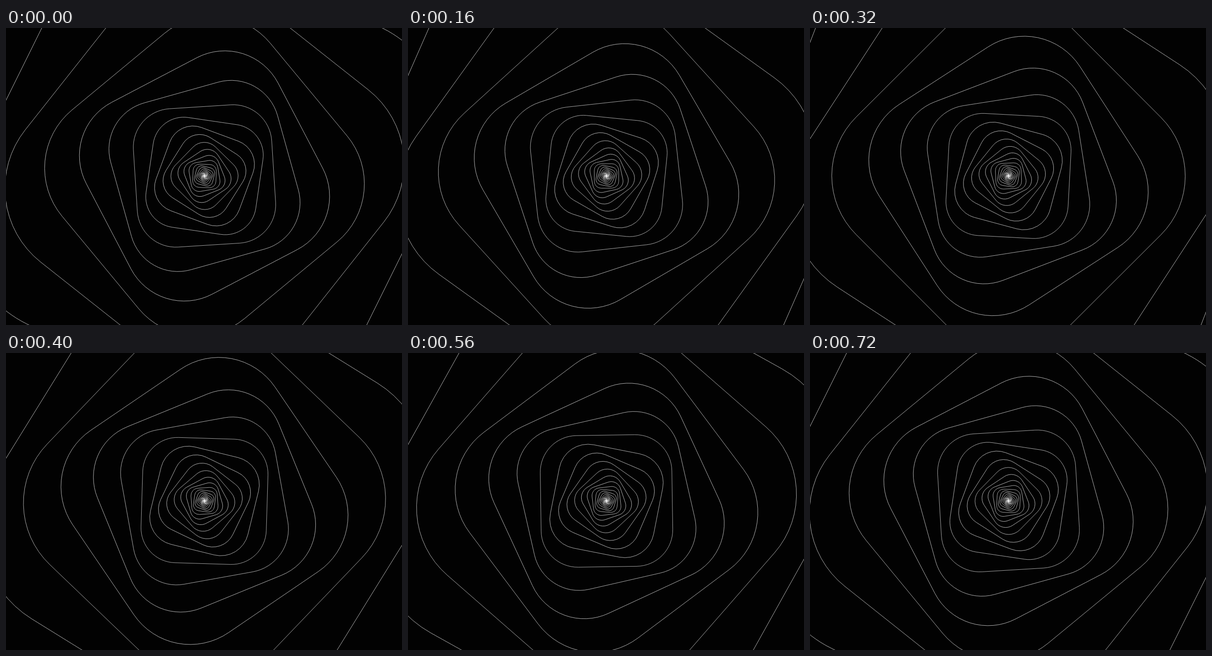
An HTML page with a canvas for the animation above (760 ms loop, 864 by 648 pixels).

```html
<!DOCTYPE html>
<html lang="en">
<head>
<meta charset="utf-8">
<title>Spiral tunnel</title>
<style>
  html, body { margin: 0; width: 100%; height: 100%; overflow: hidden; background: #020202; }
  canvas { display: block; }
</style>
</head>
<body>
<canvas id="stage" width="864" height="648"></canvas>
<script>
const ctx = document.getElementById('stage').getContext('2d');
const CENTER = [433.1, 322.8];
const STEP_MS = 40, STEPS = 19;
const STEPS_PER_RING = 18.23; // steps until a ring reaches the next one's place
const BASE = 151.2, GROWTH = 1.25, ROUNDNESS = 0.556;
const BASE_ANGLE = -3.65, TWIST = -12; // degrees

function drawRing(level) {
  const half = BASE * GROWTH ** level;
  ctx.save();
  ctx.translate(...CENTER);
  ctx.rotate((BASE_ANGLE + TWIST * level) * Math.PI / 180);
  ctx.beginPath();
  ctx.roundRect(-half, -half, 2 * half, 2 * half, half * ROUNDNESS);
  ctx.stroke();
  ctx.restore();
}

function render(now) {
  const step = Math.floor(now / STEP_MS) % STEPS;
  ctx.fillStyle = '#020202';
  ctx.fillRect(0, 0, 864, 648);
  ctx.strokeStyle = '#fff';
  ctx.lineWidth = 0.65;
  for (let n = -28; n <= 6; n++) drawRing(n + step / STEPS_PER_RING);
  requestAnimationFrame(render);
}
requestAnimationFrame(render);
</script>
</body>
</html>
```
